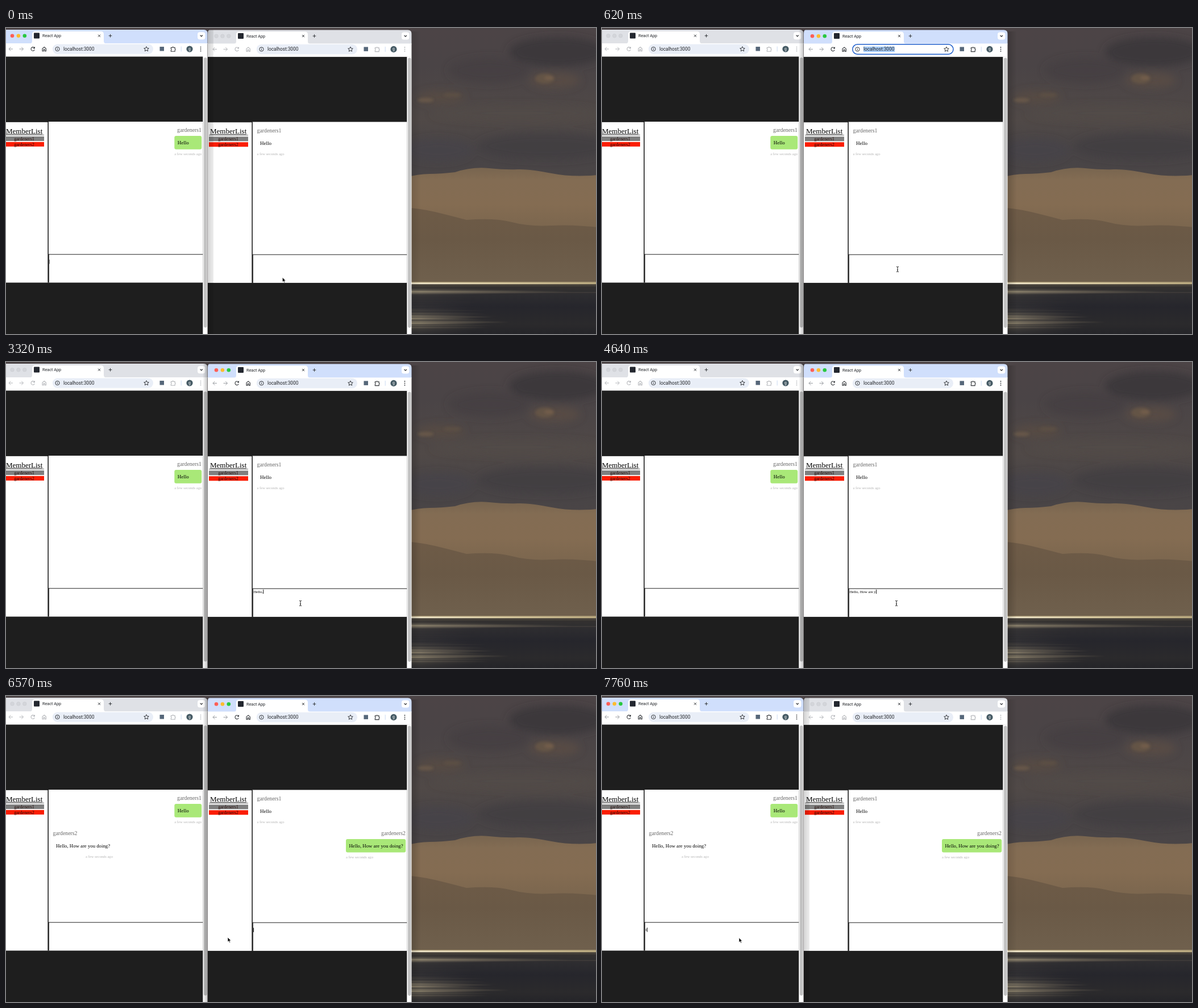
An HTML page that plays this animation: 1038 px wide and 539 px high, repeating every 8 s.

```html
<!DOCTYPE html>
<html lang="en">
<head>
<meta charset="utf-8">
<title>Chat</title>
<style>
  html, body { margin: 0; width: 100%; height: 100%; overflow: hidden; background: #4a4245; }
  svg { display: block; width: 1038px; height: 539px; }
  text { white-space: pre; font-family: "Liberation Serif", serif; }
  .ui { font-family: Roboto, sans-serif; }
  .win { --ink: #b4b6ba; --strip: #dfe1e6; --nav: #b4b6ba; }
  .win.live { --ink: #34373b; --strip: #d0dffc; --nav: #9a9da2; }
  .strip { fill: var(--strip); }
  .line { fill: none; stroke: var(--ink); stroke-width: 1.1; }
  .nav { fill: none; stroke: var(--nav); stroke-width: 1; }
  .dark { fill: none; stroke: #34373b; stroke-width: 1; }
  .ink { fill: var(--ink); }
  .lights circle { fill: #d3d5da; stroke: #c6c8cd; stroke-width: .5; }
  .lit .lights circle { fill: var(--c); stroke: none; }
  .pill { fill: #e9eef7; }
  .mark { fill: none; }
  .pick .pill { fill: #fff; stroke: #1f5fcc; stroke-width: 1.5; }
  .pick .mark { fill: #a9cdf8; }
</style>
</head>
<body>
<svg id="stage" viewBox="0 0 1038 539" xmlns="http://www.w3.org/2000/svg"></svg>
<script>
const LOOP = 8000, GAP = 359;
const LINE = 'Hello, How are you doing?', AGO = 'a few seconds ago';
const MEMBERS = ['gardeners1', 'gardeners2'];

// [time, characters typed] in the right-hand box
const TYPED = [[0, 0], [1540, 1], [1690, 2], [1840, 3], [1990, 4], [2130, 5], [2720, 6], [3020, 7],
  [3320, 6], [3470, 8], [3620, 9], [3770, 10], [3910, 11], [4060, 12], [4200, 13], [4350, 14],
  [4490, 15], [4640, 16], [4790, 17], [4930, 18], [5080, 20], [5230, 21], [5370, 22], [5520, 24],
  [5820, 25], [6120, 0]];
// [time, x, y] of the pointer
const MOUSE = [[0, 486.3, 439.3], [140, 493, 436], [300, 508, 430], [460, 519, 426], [620, 520, 425],
  [770, 518, 425], [6420, 495, 425], [6570, 390, 425], [6720, 275, 426], [6870, 241, 425.8]];

const rect = (x, y, w, h, fill, more = '') =>
  `<rect x="${x}" y="${y}" width="${w}" height="${h}" fill="${fill}" ${more}/>`;
const text = (x, y, size, str, more = '') =>
  `<text x="${x}" y="${y}" font-size="${size}" ${more}>${str}</text>`;
const path = (cls, d, more = '') => `<path class="${cls}" d="${d}" ${more}/>`;
const dot = (x, y, r, more) => `<circle cx="${x}" cy="${y}" r="${r}" ${more}/>`;
const END = 'text-anchor="end"', MID = 'text-anchor="middle"';

function message(who, str, mine, y, width, agoX) {
  const x = mine ? 344.3 - width : 82.5;
  return text(mine ? 344 : 82.5, y, 9.8, MEMBERS[who], `fill="#696969" ${mine ? END : ''}`)
    + (mine ? rect(x, y + 6.7, width, 23.6, '#a9e878', 'rx="3"') : '')
    + text(x + 5.5, y + 21.9, width < 60 ? 9 : 8.75, str)
    + text(agoX, y + 40.4, 6.57, AGO, 'fill="#b5b5b5"');
}

function chrome() {
  const lights = ['#ff5f57', '#febc2e', '#28c840']
    .map((c, i) => dot(11 + 10.9 * i, 13.8, 3.3, `style="--c:${c}"`)).join('');
  const dots = [33.6, 37, 40.4].map(y => dot(342.5, y, .95, 'class="ink"')).join('');
  return path('strip', 'M-4 28V9Q-4 3-1 3H348Q354.5 3 354.5 9.500V28Z')
    + rect(-4, 27, 358.5, 23.4, '#fff')
    + `<g class="lights">${lights}</g>`
    + '<path fill="#fff" d="M42 27.500Q46 27 46 23V11Q46 6 51 6H167Q172 6 172 11V23Q172 27 176 27.500Z"/>'
    + rect(49, 8.5, 10, 10, '#23272f', 'rx="1"')
    + text(64, 16.4, 7.25, 'React App', 'class="ui" fill="#202327"')
    + path('dark', 'M162 11.700l4 4m0-4l-4 4M180.700 13.700h5.600m-2.800-2.800v5.600')
    + rect(337, 7.2, 13.4, 13, '#fff', 'rx="4"')
    + path('dark', 'M341.600 12.600l2.200 2.200 2.200-2.200', 'style="stroke-width:1.300"')
    + path('nav', 'M12 37H5m3.300-3.300L5 37l3.300 3.300M23.500 37h7m-3.300-3.300l3.300 3.300-3.300 3.300')
    + path('line', 'M50 35A3.300 3.300 0 1 0 50.300 38.300M50.400 33.200v2.400h-2.400')
    + path('line', 'M64 36.300l3.200-2.800 3.200 2.800v4.400h-2.200v-2.900h-2v2.900h-2.200z')
    + rect(81.8, 28.4, 177.2, 17.4, '#e9eef7', 'rx="8.700" class="pill"')
    + dot(90.5, 37, 3.6, 'class="dark"')
    + path('dark', 'M90.500 36.500v2.300M90.500 34.800v.9')
    + rect(101, 32.2, 55, 9.8, 'none', 'class="mark"')
    + text(101, 40, 8.25, 'localhost:3000', 'class="ui" fill="#202327"')
    + path('dark', 'M247 32.700l1.300 2.800 3 .3-2.300 2 .7 3-2.700-1.600-2.700 1.600.7-3-2.300-2 3-.3z')
    + rect(270.5, 33, 7.5, 7.5, '#566779')
    + path('line', 'M290.300 34.500h2.200a1.200 1.200 0 0 1 2.400 0h2.300v2.200a1.200 1.200 0 0 1 0 2.300v2.200h-6.900v-2a1.400 1.400 0 0 0 0-2.600z')
    + rect(307.7, 32.5, 1, 9, '#cbdaf2')
    + dot(323, 37, 5.6, 'fill="#455a64"')
    + text(323, 39, 6.8, 'g', `class="ui" fill="#fff" ${MID}`)
    + dots;
}

function page(right) {
  const bars = MEMBERS.map((name, i) =>
    rect(-2, 191 + 9.8 * i, 69, 8, i ? '#fb1d04' : '#7f7f7f')
    + text(32, 197.7 + 9.8 * i, 8.1, name, `fill="#220b08" ${MID}`)).join('');
  return rect(-4, 50, 358.5, 489, '#fff')
    + rect(-4, 50, 350.3, 489, '#1e1e1e')
    + rect(-4, 165, 350.3, 283.5, '#fff')
    + rect(348, 52, 5.6, 475.5, '#c2c2c2', 'rx="2.800"')
    + text(0, 185.6, 13, 'MemberList')
    + rect(0, 186.7, 64, .7, '#222') + rect(-2, 188, 69, .8, '#555') + bars
    + rect(-4, 164.8, 78.5, 1, '#111')
    + rect(73.4, 165, 1.5, 283.5, '#111')
    + rect(75, 398.3, 271.3, 1, '#222') + rect(75, 398.6, .8, 49.9, '#111')
    + message(0, 'Hello', !right, 183.4, 48, right ? 82.5 : 296.3)
    + `<g class="reply">${message(1, LINE, right, 244.9, 105.3, right ? 239 : 140)}</g>`
    + `<text class="draft" font-size="6.720"></text>`
    + rect(0, 0, .9, 7.5, '#000', 'class="caret"');
}

const win = (id, dx, dy) =>
  `<g id="${id}" class="win" transform="translate(${dx} ${dy})">${page(dx > 0)}${chrome()}</g>`;

const blob = (x, y, rx, ry, fill, o = 1) =>
  `<ellipse cx="${x}" cy="${y}" rx="${rx}" ry="${ry}" fill="${fill}" opacity="${o}"/>`;
const grad = (id, dir, stops) => `<linearGradient id="${id}" ${dir}>`
  + stops.map(([o, c, a = 1]) => `<stop offset="${o}" stop-color="${c}" stop-opacity="${a}"/>`).join('')
  + '</linearGradient>';
const blur = (id, r) => `<filter id="${id}" x="-30%" y="-60%" width="160%" height="220%">`
  + `<feGaussianBlur stdDeviation="${r}"/></filter>`;
const DOWN = 'x2="0" y2="1"';

const defs = '<defs>'
  + grad('sky', DOWN, [[0, '#4c4446'], [.25, '#4a4446'], [.6, '#504947'], [.8, '#484446'], [1, '#4a4546']])
  + grad('dusk', DOWN, [[0, '#78654f'], [.1, '#836c53'], [.3, '#846c52'], [.5, '#7b664e'], [1, '#75634c']])
  + grad('haze', DOWN, [[0, '#6e5b47'], [.4, '#6a5946'], [1, '#70614e']])
  + grad('sea', DOWN, [[0, '#35322f'], [.2, '#2e2d30'], [.45, '#26262c'], [.8, '#2b2a2c'], [1, '#242428']])
  + grad('edge', '', [[0, '#f3ead0'], [.5, '#d9cba2'], [1, '#b9a97f']])
  + grad('glow', '', [[0, '#d0c09a'], [.45, '#a4957a', .7], [1, '#8f8369', 0]])
  + grad('fall', '', [[0, '#000', .18], [1, '#000', 0]])
  + grad('overR', '', [[0, '#000', .17], [1, '#000', .07]])
  + grad('overL', '', [[0, '#000', 0], [1, '#000', .24]])
  + blur('soft', 7) + blur('mist', 2) + blur('crisp', .6) + '</defs>';

// Light on the water: thin rows, strongest in two bands
function glitter() {
  let rows = '', seed = 7;
  const rnd = () => (seed = seed * 16807 % 2147483647) / 2147483647;
  const band = (y, mid, spread) => Math.exp(-(((y - mid) / spread) ** 2));
  for (let y = 455; y < 539; y += 1.3) {
    const far = band(y, 464, 3.5), near = band(y, 514, 13);
    const w = 90 + 190 * far + 60 * near * rnd() + 40 * rnd();
    const o = Math.min(.85, .06 + .6 * far + .65 * near * (.4 + rnd()));
    rows += rect(713, y.toFixed(1), w.toFixed(0), 1.1, 'url(#glow)', `opacity="${o.toFixed(2)}"`);
  }
  return rows;
}

function wallpaper() {
  return rect(0, 0, 1038, 270, 'url(#sky)')
    + '<g filter="url(#soft)">'
    + blob(970, 42, 85, 26, '#39373a', .85) + blob(850, 75, 70, 22, '#464042', .8)
    + blob(765, 122, 42, 12, '#5a4e45', .7) + blob(965, 92, 45, 14, '#5a4e47', .8)
    + blob(900, 150, 150, 14, '#544d49', .6) + blob(950, 208, 120, 24, '#403d40', .75)
    + blob(760, 215, 60, 20, '#48454a', .7) + '</g>'
    + '<g filter="url(#mist)">'
    + blob(948, 89, 17, 9, '#655546', .9) + blob(955, 88, 8, 3.5, '#745f4b', .9)
    + blob(738, 127, 14, 4, '#6b5a4a', .8) + blob(785, 118, 16, 4, '#5f5146', .6) + '</g>'
    + '<g filter="url(#crisp)">'
    + '<path fill="url(#dusk)" d="M700 264Q725 257 745 257T790 254Q820 244 850 247T900 249T960 256T1050 258V460H700Z"/>'
    + '<path fill="url(#haze)" d="M700 316Q730 318 755 324T810 338Q860 334 890 342T960 348T1050 352V460H700Z"/></g>'
    + rect(700, 447, 338, 2, '#a3926f') + rect(700, 448.4, 338, 3.2, 'url(#edge)')
    + rect(700, 451.6, 338, 88, 'url(#sea)')
    + rect(700, 453.4, 338, 1, '#5f574a') + rect(700, 465.5, 338, .8, '#504b44')
    + glitter();
}

const pointer = '<g id="mouse">'
  + '<path id="arrow" d="M0 0V8.200L1.900 6.500 3.200 9.400 4.600 8.800 3.300 6H5.900Z" fill="#000" stroke="#fff" stroke-width=".7"/>'
  + '<path id="beam" d="M-2-4.600Q0-4.600 0-3.400Q0-4.600 2-4.600M0-3.400V3.400M-2 4.600Q0 4.600 0 3.400Q0 4.600 2 4.600M-1 1.200H1" fill="none" stroke="#222" stroke-width="1"/></g>';

const $ = id => document.getElementById(id);
$('stage').innerHTML = defs + wallpaper()
  + rect(713.5, 6, 16, 533, 'url(#fall)', 'id="cast"')
  + win('left', 0, 0) + win('right', GAP, .4)
  + rect(355, 3, 10, 536, 'url(#overR)', 'id="shadeR"')
  + rect(346, 3, 9, 536, 'url(#overL)', 'id="shadeL"')
  + pointer;

const at = (keys, t) => keys.reduce((a, k) => k[0] <= t ? k : a);
const show = (el, on) => el.setAttribute('visibility', on ? 'visible' : 'hidden');
const between = (t, a, b) => t >= a && t < b;
const parts = id => {
  const el = $(id), q = s => el.querySelector(s);
  return { el, reply: q('.reply'), draft: q('.draft'), caret: q('.caret') };
};
const L = parts('left'), R = parts('right');

function type(w, str, row, caretOn, color) {
  const y = 400.4 + 7.6 * row;
  w.draft.setAttribute('x', 76.4);
  w.draft.setAttribute('y', y + 6);
  if (w.draft.textContent !== str) w.draft.textContent = str;
  w.caret.setAttribute('x', 76.4 + (str ? w.draft.getComputedTextLength() + .3 : -.2));
  w.caret.setAttribute('y', y);
  w.caret.setAttribute('fill', color);
  show(w.caret, caretOn);
}

function draw(t) {
  const rightLit = between(t, 460, 6870), rightLive = between(t, 620, 7020), sent = t >= 6120;
  L.el.classList.toggle('lit', !rightLit);
  R.el.classList.toggle('lit', rightLit);
  L.el.classList.toggle('live', !rightLive);
  R.el.classList.toggle('live', rightLive);
  R.el.classList.toggle('pick', between(t, 620, 940));
  show(L.reply, sent);
  show(R.reply, sent);
  show($('shadeR'), !rightLit);
  show($('shadeL'), rightLit);
  $('cast').setAttribute('opacity', rightLit ? 1 : .6);

  const on = between(t, 940, 1390) || between(t, 1540, 2430) || between(t, 2720, 6870);
  type(R, LINE.slice(0, at(TYPED, t)[1]), sent ? 1 : 0, on, '#000');
  const wrote = t >= 7760;
  type(L, wrote ? 'I' : '', 1, !rightLit && !between(t, 7470, 7620), wrote ? '#000' : '#777');

  const [, x, y] = at(MOUSE, t), beam = rightLit && x > 434;
  $('mouse').setAttribute('transform', `translate(${x} ${y})`);
  show($('beam'), beam);
  show($('arrow'), !beam);
}

function tick() {
  draw(performance.now() % LOOP);
  requestAnimationFrame(tick);
}
tick();
</script>
</body>
</html>
```
